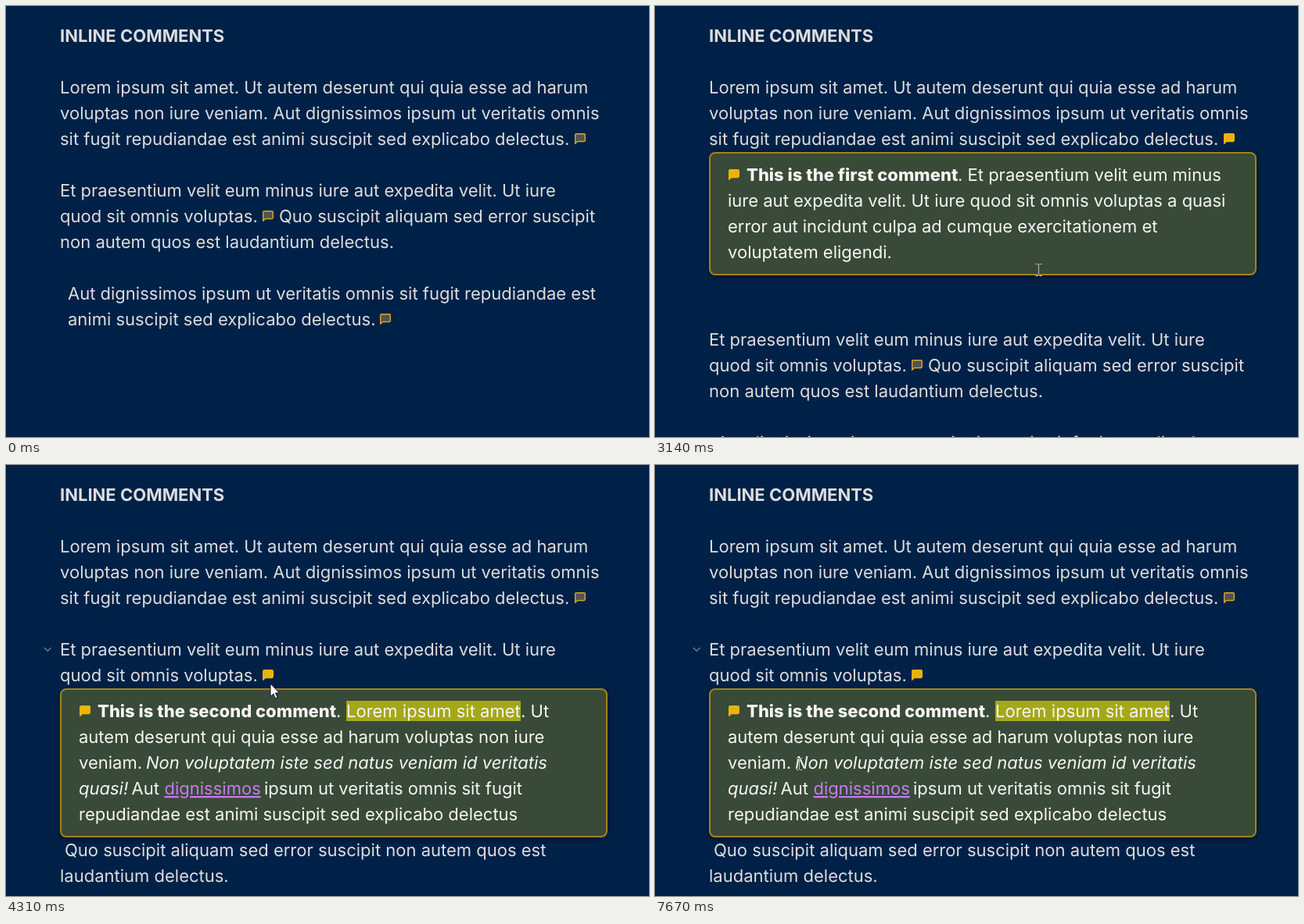
Recreate the animation shown at these times as an HTML page. Size 822 by 552 pixels, loop 8 s.

```html
<!DOCTYPE html>
<html lang="en">
<head>
<meta charset="utf-8">
<title>Inline comments</title>
<style>
  html, body { margin: 0; width: 100%; height: 100%; overflow: hidden; background: #002147; }
  svg { display: block; width: 822px; height: 552px; }
  text {
    font: 400 22px Inter, sans-serif;
    font-optical-sizing: none;
    text-rendering: geometricPrecision;
    white-space: pre;
    fill: #dcdddd;
  }
  .heading { font-weight: 700; }
  .box text { fill: #f6f6f4; }
  .box .strong { font-weight: 800; }
  .box .em { font-style: italic; }
  .box .link { fill: #c77af2; text-decoration: underline; }
  .panel { fill: #394a38; stroke: #a3831b; stroke-width: 2; filter: drop-shadow(0 2px 3px rgba(0, 0, 0, .45)); }
  .mark { fill: #a4a818; }
  .icon { fill: #4d5650; stroke: #dca528; stroke-width: 2; stroke-linejoin: round; }
  .icon.on { fill: #e8b40c; stroke: #e8b40c; }
  .chevron { fill: none; stroke: #6f7882; stroke-width: 1.5; }
  .arrow { fill: #fff; stroke: #10151c; stroke-width: 1; }
  .beam { fill: none; stroke: #fff; stroke-width: 1; mix-blend-mode: difference; }
</style>
</head>
<body>
<svg id="stage" viewBox="0 0 822 552"></svg>
<script>
const LOOP = 8000;
const stage = document.getElementById('stage');

function add(parent, tag, attrs, content) {
  const node = document.createElementNS('http://www.w3.org/2000/svg', tag);
  for (const key in attrs) node.setAttribute(key, attrs[key]);
  if (content) node.textContent = content;
  parent.append(node);
  return node;
}
const group = (parent, cls = '') => add(parent, 'g', { class: cls });
const text = (parent, x, y, content, cls = '') => add(parent, 'text', { x, y, class: cls }, content);
const lines = (parent, x, y, list) => list.forEach((line, i) => text(parent, x, y + 33 * i, line));
const show = (node, visible) => node.setAttribute('display', visible ? 'inline' : 'none');

// Speech bubble centred on (x, y)
function icon(parent, x, y, on) {
  return add(parent, 'path', {
    class: on ? 'icon on' : 'icon',
    transform: `translate(${x} ${y}) scale(.7) translate(-12 -12)`,
    d: 'M21 15a2 2 0 0 1-2 2H7l-4 4V5a2 2 0 0 1 2-2h14a2 2 0 0 1 2 2z'
  });
}

function commentBox(y, height, title) {
  const box = group(stage, 'box');
  add(box, 'rect', { class: 'panel', x: 70, y: y + 1, width: 698, height: height - 2, rx: 7 });
  icon(box, 101, y + 29, true);
  text(box, 117, y + 37, title, 'strong');
  return box;
}

// First paragraph
text(stage, 69, 46, 'INLINE COMMENTS', 'heading');
lines(stage, 69, 112, [
  'Lorem ipsum sit amet. Ut autem deserunt qui quia esse ad harum',
  'voluptas non iure veniam. Aut dignissimos ipsum ut veritatis omnis',
  'sit fugit repudiandae est animi suscipit sed explicabo delectus.'
]);
const firstIcon = icon(stage, 734, 170);

// Second paragraph and quote
const lower = group(stage);
lines(lower, 69, 244, [
  'Et praesentium velit eum minus iure aut expedita velit. Ut iure',
  'quod sit omnis voluptas.'
]);
const secondIcon = icon(lower, 335, 269);
const rest = group(lower);
text(rest, 349, 277, 'Quo suscipit aliquam sed error suscipit');
text(rest, 69, 310, 'non autem quos est laudantium delectus.');
lines(rest, 79, 376, [
  'Aut dignissimos ipsum ut veritatis omnis sit fugit repudiandae est',
  'animi suscipit sed explicabo delectus.'
]);
icon(rest, 485, 401);

// First comment
const firstBox = commentBox(187, 158, 'This is the first comment');
text(firstBox, 387, 224, '. Et praesentium velit eum minus');
lines(firstBox, 93, 257, [
  'iure aut expedita velit. Ut iure quod sit omnis voluptas a quasi',
  'error aut incidunt culpa ad cumque exercitationem et',
  'voluptatem eligendi.'
]);

// Second comment
const secondBox = commentBox(286, 191, 'This is the second comment');
add(secondBox, 'rect', { class: 'mark', x: 435, y: 302, width: 223, height: 26 });
text(secondBox, 422, 323, '.');
text(secondBox, 435, 323, 'Lorem ipsum sit amet');
text(secondBox, 658, 323, '. Ut');
text(secondBox, 93, 356, 'autem deserunt qui quia esse ad harum voluptas non iure');
text(secondBox, 93, 389, 'veniam.');
text(secondBox, 179, 389, 'Non voluptatem iste sed natus veniam id veritatis', 'em');
text(secondBox, 93, 422, 'quasi!', 'em');
text(secondBox, 160.5, 422, 'Aut');
text(secondBox, 202.5, 422, 'dignissimos', 'link');
text(secondBox, 330, 422, 'ipsum ut veritatis omnis sit fugit');
text(secondBox, 93, 455, 'repudiandae est animi suscipit sed explicabo delectus');

const tail = group(stage);
text(tail, 75, 501, 'Quo suscipit aliquam sed error suscipit non autem quos est');
text(tail, 69, 534, 'laudantium delectus.');
add(tail, 'path', { class: 'chevron', d: 'M49 234l4.3 4.2 4.3-4.2' });

const cursors = {
  arrow: add(stage, 'path', { class: 'arrow', d: 'M0 0V16.5L3.8 13 6.3 18.8 9 17.6 6.5 12H11.5Z' }),
  beam: add(stage, 'path', { class: 'beam', d: 'M-3.5-7.5H-1L.5-6.5 2-7.5H4.5M.5-6.5V6.5M-3.5 7.5H-1L.5 6.5 2 7.5H4.5' })
};

// time, open comment, cursor, x, y
const steps = [
  [0, 0, 'none', 0, 0],
  [150, 0, 'arrow', 748, 196],
  [310, 1, 'arrow', 741, 179],
  [480, 1, 'arrow', 738, 173],
  [2470, 1, 'arrow', 703, 200],
  [2640, 1, 'beam', 655, 232],
  [2810, 1, 'beam', 600, 268],
  [2970, 1, 'beam', 545, 303],
  [3140, 1, 'beam', 490, 338],
  [3310, 0, 'beam', 450, 365],
  [3470, 0, 'beam', 432, 358],
  [3640, 0, 'beam', 410, 338],
  [3810, 0, 'beam', 385, 318],
  [3980, 0, 'beam', 362, 298],
  [4150, 2, 'arrow', 341, 283],
  [4310, 2, 'arrow', 338, 280],
  [4480, 2, 'arrow', 337, 279],
  [5470, 2, 'arrow', 343, 285],
  [5640, 2, 'beam', 352, 300],
  [5810, 2, 'beam', 362, 314],
  [5970, 2, 'beam', 373, 326],
  [6140, 2, 'beam', 382, 334],
  [6310, 2, 'beam', 388, 338],
  [6490, 2, 'beam', 393, 340],
  [6660, 2, 'beam', 387, 349],
  [6830, 2, 'beam', 352, 357],
  [7000, 2, 'beam', 312, 364],
  [7170, 2, 'beam', 272, 371],
  [7330, 2, 'beam', 235, 378],
  [7500, 2, 'beam', 204, 383],
  [7670, 2, 'beam', 184, 383]
];

let current;
function render(time) {
  const step = steps.findLast(([start]) => start <= time);
  if (step === current) return;
  current = step;
  const [, open, cursor, x, y] = step;
  show(firstBox, open === 1);
  show(secondBox, open === 2);
  show(tail, open === 2);
  show(rest, open !== 2);
  firstIcon.classList.toggle('on', open === 1);
  secondIcon.classList.toggle('on', open === 2);
  lower.setAttribute('transform', `translate(0 ${open === 1 ? 191 : 0})`);
  for (const kind in cursors) {
    show(cursors[kind], kind === cursor);
    cursors[kind].setAttribute('transform', `translate(${x} ${y})`);
  }
}

const begin = performance.now();
function tick() {
  render((performance.now() - begin) % LOOP);
  requestAnimationFrame(tick);
}
tick();
</script>
</body>
</html>
```
